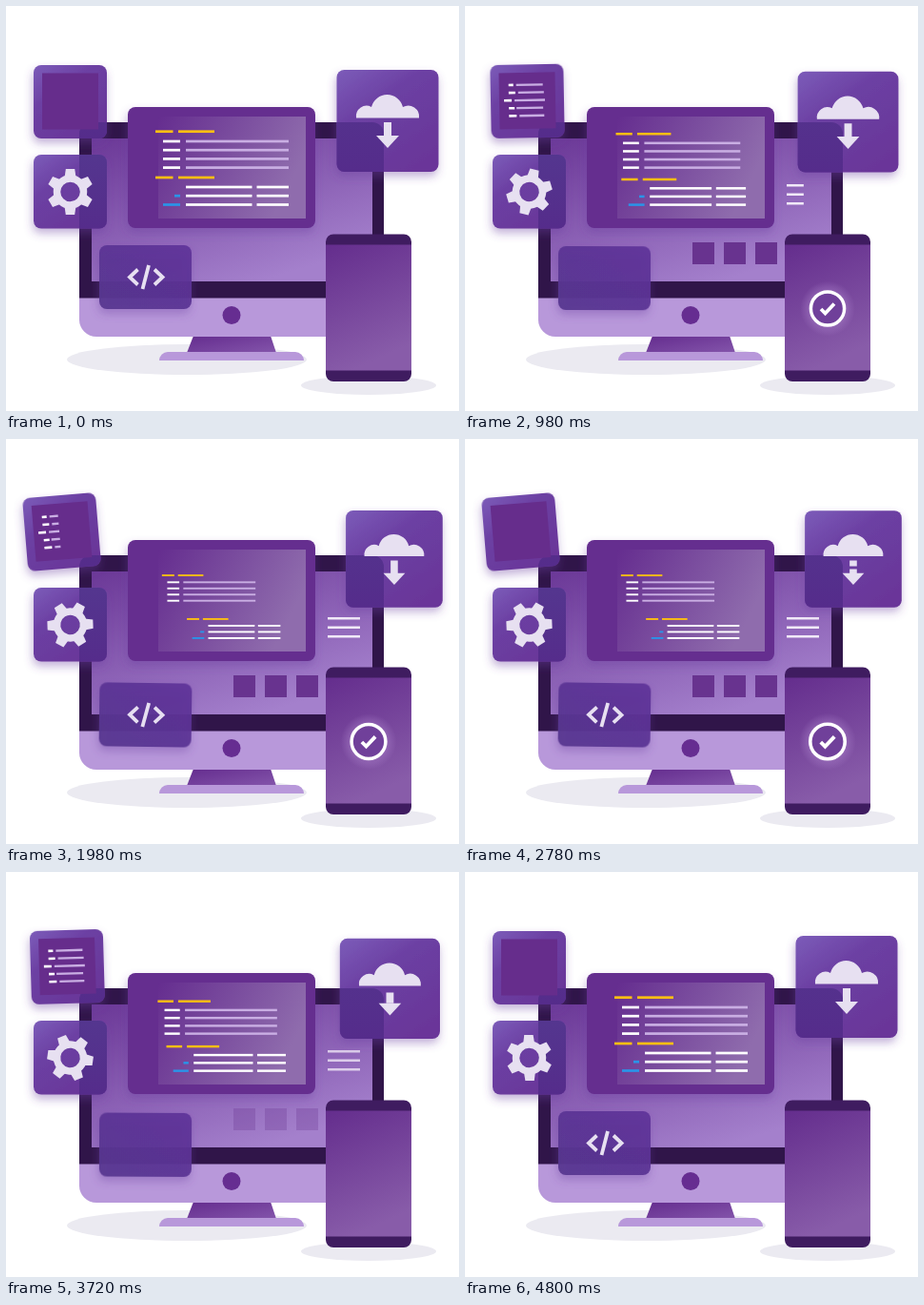
Recreate the animation shown at these times as an HTML page. Size 476 by 425 pixels, loop 4.82 s.

```html
<!DOCTYPE html>
<html lang="en">
<head>
<meta charset="utf-8">
<title>Devices</title>
<style>
html, body { margin: 0; width: 100%; height: 100%; overflow: hidden; background: #fff; }
svg { display: block; width: 100vw; height: 100vh; }
</style>
</head>
<body>
<svg viewBox="0 0 476 425">
  <defs>
    <linearGradient id="screen" x1="0" y1="0" x2=".6" y2="1">
      <stop offset="0" stop-color="#6b3897"/><stop offset="1" stop-color="#a480cc"/>
    </linearGradient>
    <linearGradient id="card" x1="0" y1="0" x2=".7" y2="1">
      <stop offset="0" stop-color="#7c5cb9"/><stop offset=".4" stop-color="#6c40a3"/><stop offset="1" stop-color="#6a3699"/>
    </linearGradient>
    <linearGradient id="glass" x1="0" y1="0" x2="0" y2="1">
      <stop offset="0" stop-color="#54368f"/><stop offset="1" stop-color="#552c8b"/>
    </linearGradient>
    <linearGradient id="tag" x1="1" y1="0" x2="0" y2="1">
      <stop offset="0" stop-color="#5f3399"/><stop offset="1" stop-color="#56358f"/>
    </linearGradient>
    <linearGradient id="pane" x1="0" y1="0" x2="1" y2=".35">
      <stop offset="0" stop-color="#652d8f"/><stop offset="1" stop-color="#8f6cad"/>
    </linearGradient>
    <linearGradient id="phone" x1="0" y1="0" x2=".3" y2="1">
      <stop offset="0" stop-color="#642d8d"/><stop offset="1" stop-color="#885ca9"/>
    </linearGradient>
    <linearGradient id="stand" x1="0" y1="0" x2="1" y2="1">
      <stop offset="0" stop-color="#642c8e"/><stop offset="1" stop-color="#8455ab"/>
    </linearGradient>
    <radialGradient id="glow">
      <stop offset=".5" stop-color="#b78fd6" stop-opacity=".5"/><stop offset="1" stop-color="#b78fd6" stop-opacity="0"/>
    </radialGradient>
    <filter id="shadow" x="-30%" y="-30%" width="160%" height="160%">
      <feDropShadow dx="-1" dy="5" stdDeviation="5" flood-color="#6b3fa0" flood-opacity=".4"/>
    </filter>
    <clipPath id="body"><path d="M77 347V134a12 12 0 0 1 12-12H385a12 12 0 0 1 12 12V347Z"/></clipPath>
    <clipPath id="wipe"><rect id="wipeBox" x="36" y="70" width="0" height="60"/></clipPath>
  </defs>

  <ellipse cx="190" cy="371" rx="126" ry="16" fill="#ebeaf1"/>
  <ellipse cx="381" cy="398" rx="71" ry="10" fill="#ebeaf1"/>

  <path d="M197 346H278L284 364H190Z" fill="url(#stand)"/>
  <path d="M161 372a9 9 0 0 1 9-9H304a9 9 0 0 1 9 9Z" fill="#b898da"/>
  <path d="M77 307V134a12 12 0 0 1 12-12H385a12 12 0 0 1 12 12V307Z" fill="#301549"/>
  <path d="M77 306.500H397V329a18 18 0 0 1-18 18H95a18 18 0 0 1-18-18Z" fill="#b898da"/>
  <rect x="90" y="139" width="295" height="150" fill="url(#screen)"/>
  <circle cx="237" cy="324.500" r="9.500" fill="#662d91"/>

  <g id="tiles" fill="#68338f">
    <rect x="239" y="248" width="23" height="23"/>
    <rect x="272" y="248" width="23" height="23"/>
    <rect x="305" y="248" width="23" height="23"/>
  </g>
  <path id="menu" fill="none" stroke="#f1eaf8" stroke-width="2.600"/>

  <rect x="128" y="106" width="197" height="127" rx="8" fill="#652d8f" filter="url(#shadow)"/>
  <rect x="160" y="116" width="155" height="107" fill="url(#pane)"/>
  <g id="codeA"></g>
  <g id="codeB"></g>

  <g id="listCard">
    <rect x="29" y="62" width="77" height="77" rx="8" fill="url(#card)" filter="url(#shadow)"/>
  </g>
  <g clip-path="url(#body)"><g id="listGlass"><rect x="29" y="62" width="77" height="77" rx="8" fill="url(#glass)"/></g></g>
  <g id="listFace">
    <rect x="38" y="70.500" width="59" height="59" fill="#662d8c"/>
    <g id="rows" clip-path="url(#wipe)"></g>
  </g>

  <rect x="29" y="156" width="77" height="77.500" rx="8" fill="url(#card)" filter="url(#shadow)"/>
  <g clip-path="url(#body)"><rect x="29" y="156" width="77" height="77.500" rx="8" fill="url(#glass)"/></g>
  <g id="gear" fill="#e7e0f1"><circle r="14" fill="none" stroke="#e7e0f1" stroke-width="7.500"/></g>

  <g id="tagCard">
    <rect x="98" y="251" width="97" height="67" rx="8" fill="url(#tag)" fill-opacity=".93" filter="url(#shadow)"/>
    <path id="tagIcon" d="M138.500 276.500 130 284.500 138.500 292.500M156 276.500 164.500 284.500 156 292.500M150 272 143.500 297" fill="none" stroke="#e7e0f1" stroke-width="3.800"/>
  </g>

  <g id="cloudCard">
    <rect x="347.500" y="67" width="107" height="107" rx="8" fill="url(#card)" filter="url(#shadow)"/>
  </g>
  <g clip-path="url(#body)"><g id="cloudGlass"><rect x="347.500" y="67" width="107" height="107" rx="8" fill="url(#glass)"/></g></g>
  <g id="cloudFace" fill="#e7e0f1">
    <path d="M368 117.500A11 11 0 0 1 384 106A17 17 0 0 1 417 106A11.500 11.500 0 0 1 434 117.500Z"/>
    <path d="M389 136H413L401 149Z"/>
    <path id="shaft"/>
  </g>

  <rect x="336" y="239.500" width="90" height="154.500" rx="8" fill="#3f1c60"/>
  <rect x="336" y="250.500" width="90" height="132" fill="url(#phone)"/>
  <g id="check">
    <circle r="29" fill="url(#glow)"/>
    <circle r="17.700" fill="#70409a" stroke="#fff" stroke-width="3.500"/>
    <path d="M-7 .5-2.500 5 7-5" fill="none" stroke="#fff" stroke-width="3.800"/>
  </g>
</svg>
<script>
const LOOP = 4820, HALF = LOOP / 2;
const NS = 'http://www.w3.org/2000/svg';
const $ = id => document.getElementById(id);
const set = (id, name, value) => $(id).setAttribute(name, value);
const ramp = (t, a, b) => Math.min(1, Math.max(0, (t - a) / (b - a)));
const smooth = p => p * p * (3 - 2 * p);
const quartic = p => p < .5 ? 8 * p ** 4 : 1 - 8 * (1 - p) ** 4;

function bar(parent, x1, x2, y, color, h = 2.7) {
  const r = document.createElementNS(NS, 'rect');
  const attrs = { x: x1, y: y - h / 2, width: x2 - x1, height: h, fill: color };
  for (const k in attrs) r.setAttribute(k, attrs[k]);
  $(parent).append(r);
}

const WHITE = '#fff', LILAC = '#c9aee3', GOLD = '#fdbf12', BLUE = '#2a94e8';

for (const [id, y] of [['codeA', 131.7], ['codeB', 180]]) {
  bar(id, 157, 175.500, y, GOLD);
  bar(id, 181, 219, y, GOLD);
}
for (const y of [142, 151.2, 160.4, 169.6]) {
  bar('codeA', 165, 183, y, WHITE);
  bar('codeA', 189, 297, y, LILAC);
}
for (const y of [190, 199.2, 208.5]) {
  bar('codeB', 189, 258.500, y, WHITE);
  bar('codeB', 263.500, 297, y, WHITE);
}
bar('codeB', 177, 183, 199.2, BLUE);
bar('codeB', 165, 183, 208.5, BLUE);

[[48, 53, 56, 84], [48, 55, 58, 85], [43, 51, 54, 86], [48, 54, 56, 84], [48, 56, 59, 85]]
  .forEach(([a, b, c, d], i) => {
    const y = 83.3 + i * 8.1;
    bar('rows', a, b, y, WHITE, 2.6);
    bar('rows', c, d, y, LILAC, 2.4);
  });

for (let a = 0; a < 360; a += 60) {
  const tooth = document.createElementNS(NS, 'path');
  tooth.setAttribute('d', 'M-6-15-4.700-24H4.700L6-15Z');
  tooth.setAttribute('transform', `rotate(${a})`);
  $('gear').append(tooth);
}

// Place a group: shift, turn and scale about its own centre.
function pose(ids, cx, cy, dx, dy, turn, size) {
  const m = `translate(${cx + dx} ${cy + dy}) rotate(${turn}) scale(${size}) translate(${-cx} ${-cy})`;
  for (const id of ids) set(id, 'transform', m);
}

function draw(t) {
  const half = t % HALF;
  const s = quartic(t < HALF ? t / HALF : (LOOP - t) / HALF);
  const shrink = 1 - .3 * s;

  pose(['codeA'], 180, 170, 0, 0, 0, shrink);
  pose(['codeB'], 268, 210, 0, 0, 0, shrink);
  pose(['listCard', 'listGlass', 'listFace'], 67.5, 100.5, -9 * s, -3 * s, -4.8 * s, 1);
  pose(['tagCard'], 146.5, 284.5, 0, 5 * s, .8 * s, 1);
  pose(['cloudCard', 'cloudGlass', 'cloudFace'], 401, 120.5, 7 * s, 5.5 * s, 0, 1 - .05 * s);

  set('gear', 'transform', `translate(67.5 195) rotate(${360 * t / LOOP})`);
  set('wipeBox', 'width', 54 * (ramp(half, 310, 850) - ramp(half, 1750, 2250)));
  set('tagIcon', 'opacity', 1 - smooth(ramp(half, 420, 860)) + smooth(ramp(half, 1450, 2000)));

  // A break runs down the arrow's shaft.
  const gap = 122 + (t % (HALF / 2) - 120) * .026;
  const top = Math.min(136, Math.max(122, gap));
  const end = Math.min(136, Math.max(122, gap + 3));
  set('shaft', 'd', `M397 122H405V${top}H397ZM397 ${end}H405V136.200H397Z`);

  set('tiles', 'opacity', smooth(ramp(t, 100, 520)) - smooth(ramp(t, 3200, 4000)));

  const w = 34 * (1 - (1 - ramp(t, 750, 1800)) ** 3);
  set('menu', 'd', [188.3, 197.8, 207.3].map(y => `M338 ${y}h${w}`).join(''));
  set('menu', 'opacity', t < 750 ? 0 : 1 - smooth(ramp(t, 3500, 4220)));

  const size = 1.2 * smooth(ramp(t, 220, 560)) - .22 * smooth(ramp(t, 600, 1050)) + .05 * smooth(ramp(t, 1400, 2400));
  set('check', 'transform', `translate(381 317.5) scale(${size})`);
  set('check', 'opacity', ramp(t, 220, 400) * (1 - smooth(ramp(t, 3150, 3700))));
}

const start = performance.now();
function tick() {
  draw((performance.now() - start) % LOOP);
  requestAnimationFrame(tick);
}
tick();
</script>
</body>
</html>
```
